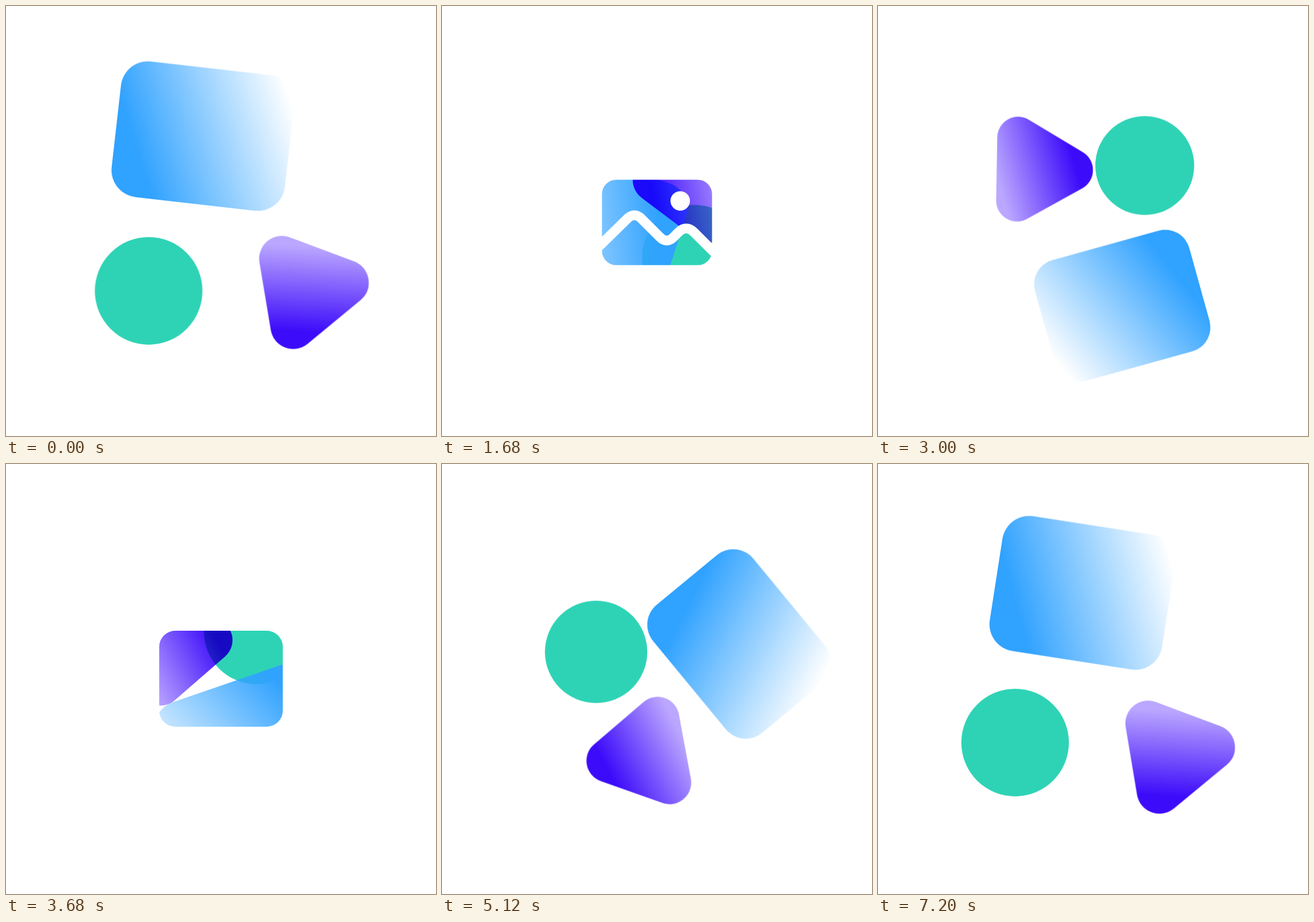
These frames come from a looping animation (748 by 748 pixels, 7.24 s). An HTML page:

```html
<!DOCTYPE html>
<html lang="en">
<head>
<meta charset="utf-8">
<title>Shapes to icons</title>
<style>
  html, body { margin: 0; width: 100%; height: 100%; overflow: hidden; background: #fff; }
  svg { display: block; width: 100vw; height: 100vh; }
  #tri { mix-blend-mode: multiply; }
</style>
</head>
<body>
<svg viewBox="0 0 748 748">
  <defs>
    <linearGradient id="sky" gradientUnits="userSpaceOnUse" x1="-112" y1="42" x2="150" y2="-74">
      <stop offset="0" stop-color="#30a2ff"/>
      <stop offset="1" stop-color="#30a2ff" stop-opacity="0"/>
    </linearGradient>
    <linearGradient id="violet" gradientUnits="userSpaceOnUse" x1="72" y1="-22" x2="-72" y2="22">
      <stop offset="0" stop-color="#3d0cfa"/>
      <stop offset="1" stop-color="#bba7ff"/>
    </linearGradient>
    <clipPath id="frame">
      <rect id="window" x="-107.5" y="-83.5" width="215" height="167" rx="28"/>
    </clipPath>
  </defs>
  <rect width="748" height="748" fill="#fff"/>
  <g clip-path="url(#frame)">
    <circle id="disc" r="95" fill="#2ed3b5"/>
    <rect id="card" x="-154" y="-120.5" width="308" height="241" rx="48" fill="url(#sky)"/>
    <path id="tri" fill="url(#violet)"/>
    <use href="#tri" opacity=".25"/>
    <g id="photo">
      <g transform="scale(1.12)">
        <path d="M-104 44.5 L-53 -5.5 Q-39.5 -19.5 -26 -5.5 L5 25.5 Q17 37.5 29 25.5 L37 17.5 Q51 3.5 65 17.5 L103 55.5"
              fill="none" stroke="#fff" stroke-width="17"/>
        <circle cx="40.5" cy="-37.5" r="17" fill="#fff"/>
      </g>
    </g>
    <path id="play" d="M-23 -28.5 V28 L28 -.5 Z" fill="#fff" stroke="#fff" stroke-width="22" stroke-linejoin="round"/>
  </g>
</svg>
<script>
const LOOP = 7240, STEP = 40, CENTER = 374;
const GATHER = 600, SPREAD = 500, SQUEEZE = 160;
const byId = id => document.getElementById(id);

// Key poses: [orbit angle, turn, reach]; gathered poses hold still and take the shape's own near reach.
const poses = [
  { at: 0, size: .985, disc: [136, 0, 175], card: [258, 6.5, 151], tri: [38.4, 110.5, 191] },
  { at: 760, size: .96, disc: [45, 0, 150], card: [170, -55, 152], tri: [-62, -70, 135] },
  { at: 1500, until: 1680, size: .96, disc: [44, 0], card: [173.5, -162], tri: [-45, -173] },
  { at: 3000, size: .905, disc: [-47, 0, 132], card: [71, -195.5, 156], tri: [-138, -359, 134] },
  { at: 4360, size: 1, disc: [-60, 0, 155], card: [63.5, -203, 185], tri: [-156, -383.5, 135] },
  { at: 5120, size: .937, disc: [-156, 0, 116], card: [-23, -309.5, 156], tri: [-261, -550.5, 132] },
  { at: 5960, until: 6440, size: .97, disc: [-136, 0], card: [-8, -318], tri: [-244, -610] }
];
const icons = [
  { start: 900, leave: 1720, y: 376.5, glyph: byId('photo') },
  { start: 3020, leave: 3840, y: 373.5 },
  { start: 5140, leave: 6600, y: 370.5, glyph: byId('play') }
];

const clamp = u => Math.min(1, Math.max(0, u));
const smooth = u => (u = clamp(u), u * u * (3 - 2 * u));
const easeOut = u => 1 - (1 - clamp(u)) ** 3;

// Smooth curve through one value of every pose; a full loop adds `lap`.
function track(pick, lap = 0) {
  const keys = [];
  for (const p of poses) {
    const v = pick(p);
    if (v === undefined) continue;
    keys.push([p.at, v]);
    if (p.until) keys.push([p.until, v]);
  }
  keys.push([LOOP, keys[0][1] + lap]);
  const n = keys.length - 1;
  const slope = i => (keys[i + 1][1] - keys[i][1]) / (keys[i + 1][0] - keys[i][0]);
  const tangent = i => {
    const a = slope(i ? i - 1 : n - 1), b = slope(i < n ? i : 0);
    return a * b <= 0 ? 0 : 2 * a * b / (a + b);
  };
  return t => {
    const i = keys.findIndex(k => k[0] > t) - 1;
    const [t0, v0] = keys[i], [t1, v1] = keys[i + 1];
    const w = t1 - t0, u = (t - t0) / w, v = 1 - u;
    return v0 + (v1 - v0) * smooth(u) + u * v * w * (v * tangent(i) - u * tangent(i + 1));
  };
}

const shape = (name, near, turns) => ({
  el: byId(name), near,
  angle: track(p => p[name][0], -360),
  turn: track(p => p[name][1], -360 * turns),
  reach: track(p => p[name][2])
});
const shapes = [shape('disc', 102, 0), shape('card', 126, 1), shape('tri', 100, 2)];
const sizeAt = track(p => p.size);

// Equilateral triangle with round corners, solid corner on +x.
function roundTriangle(reach, r) {
  const at = (a, b) => {
    const A = a * Math.PI / 180, B = b * Math.PI / 180;
    return `${reach * Math.cos(A) + r * Math.cos(B)} ${reach * Math.sin(A) + r * Math.sin(B)}`;
  };
  return [0, 120, 240].map((a, i) =>
    `${i ? 'L' : 'M'}${at(a, a - 60)} A${r} ${r} 0 0 1 ${at(a, a + 60)}`).join(' ') + 'Z';
}
byId('tri').setAttribute('d', roundTriangle(70, 40));

const place = (el, x, y, scale, turn = 0) =>
  el.setAttribute('transform', `translate(${x} ${y}) rotate(${turn}) scale(${scale})`);

const gathered = (icon, t) => t < icon.leave
  ? smooth((t - icon.start) / GATHER)
  : 1 - easeOut((t - icon.leave) / SPREAD);

function draw(t) {
  let near = 0, squeeze = 1, y = CENTER;
  for (const icon of icons) {
    const g = gathered(icon, t);
    const s = 1 - .13 * g * smooth((t - icon.leave) / SQUEEZE + 1);
    if (g > 0) [near, squeeze, y] = [g, s, icon.y];
    if (icon.glyph) place(icon.glyph, CENTER, icon.y, Math.max(0, 3 * g - 2) * s);
  }
  place(byId('window'), CENTER, y, (5 - 4 * near) * squeeze);

  for (const s of shapes) {
    const a = s.angle(t) * Math.PI / 180;
    const far = s.reach(t);
    const d = far + (s.near * squeeze - far) * near;
    place(s.el, CENTER + d * Math.cos(a), CENTER + d * Math.sin(a), sizeAt(t), s.turn(t));
  }
}

const start = performance.now();
function tick() {
  const t = (performance.now() - start) % LOOP;
  draw(Math.floor(t / STEP) * STEP);
  requestAnimationFrame(tick);
}
tick();
</script>
</body>
</html>
```
